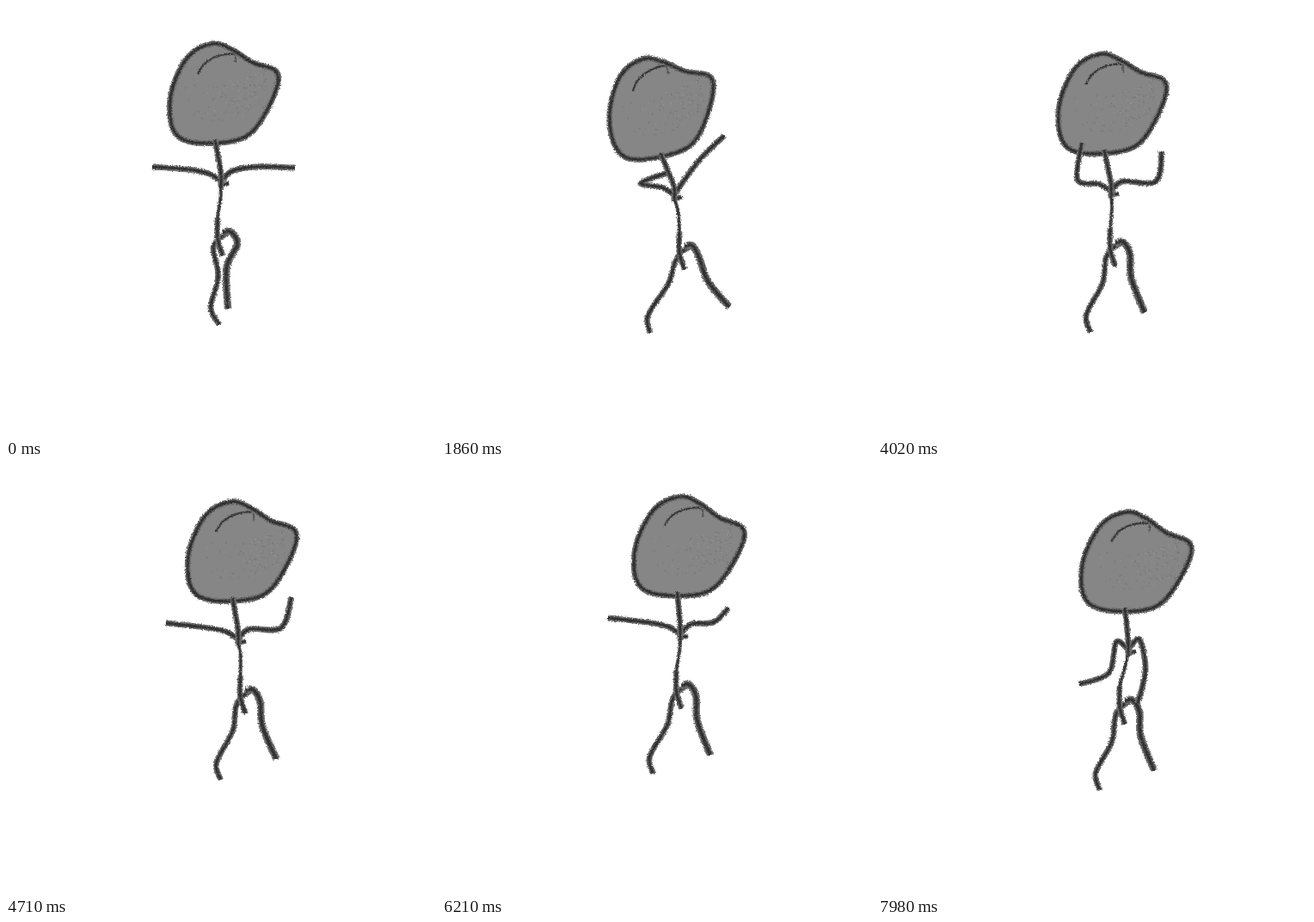
Write an HTML page that moves like this. It is 500 by 500 pixels and loops after 8000 ms.

```html
<!DOCTYPE html>
<html lang="en">
<head>
<meta charset="utf-8">
<title>Dancing stick figure</title>
<style>
  html, body { margin: 0; width: 100%; height: 100%; overflow: hidden; background: #fff; }
  svg { display: block; width: 100vw; height: 100vh; }
  path { fill: none; stroke-linejoin: round; }
</style>
</head>
<body>
<svg viewBox="0 0 500 500">
  <defs>
    <filter id="rough" filterUnits="userSpaceOnUse" x="0" y="0" width="500" height="500" color-interpolation-filters="sRGB">
      <feTurbulence type="fractalNoise" baseFrequency="0.6" numOctaves="2" seed="4"/>
      <feColorMatrix values="1 0 0 0 0  0 1 0 0 0  0 0 1 0 0  0 0 0 0 1" result="noise"/>
      <feDisplacementMap in="SourceGraphic" in2="noise" scale="3.5" xChannelSelector="R" yChannelSelector="G"/>
    </filter>
  </defs>
  <g id="figure" filter="url(#rough)"><g id="head"></g></g>
</svg>
<script>
const LOOP = 8000, STEP = 30;
const NS = 'http://www.w3.org/2000/svg';
const figure = document.getElementById('figure');
const head = document.getElementById('head');

// Dance poses. Hands and the right elbow are measured from the chest;
// knees, foot heights and the left elbow follow from the rest.
const pose = (t, neck, lean, hip, feet, handL, elbowR, handR) =>
  ({ t, v: [...neck, lean, hip, ...feet, ...handL, ...elbowR, ...handR] });
const POSES = [
  pose(0,    [243, 158], 7,  251, [248, 258], [-80, -16], [40, -16], [86, -15]),
  pose(1860, [254, 174], 16, 281, [242, 334], [-8, -25],  [32, -43], [58, -68]),
  pose(2670, [290, 171], 9,  293, [243, 338], [-3, -31],  [37, -32], [75, -48]),
  pose(4020, [263, 170], 8,  275, [247, 310], [-34, -56], [52, -11], [59, -46]),
  pose(5400, [278, 158], 5,  280, [252, 319], [-10, -45], [48, -14], [65, -50]),
  pose(7020, [283, 158], 2,  275, [239, 305], [-37, -56], [30, -12], [47, -9]),
  pose(7980, [287, 170], 4,  286, [258, 321], [-57, 41],  [20, 25],  [11, 63])
];
const ARM_OUT = [-84, -18];

const mix = (a, b, k) => a + (b - a) * k;

// Eased pose values, and a swing that peaks halfway between two poses
function sample(t) {
  let i = 0;
  while (i < POSES.length - 2 && t >= POSES[i + 1].t) i++;
  const a = POSES[i], b = POSES[i + 1];
  const u = Math.min(1, (t - a.t) / (b.t - a.t));
  const e = u * u * (3 - 2 * u);
  return { v: a.v.map((x, k) => mix(x, b.v[k], e)), swing: Math.sin(Math.PI * u) ** 2 };
}

// Smooth curve through all points
function curve(pts, closed) {
  const n = pts.length;
  const at = i => closed ? pts[(i + n) % n] : pts[Math.max(0, Math.min(n - 1, i))];
  let d = 'M' + pts[0];
  for (let i = 0; i < (closed ? n : n - 1); i++) {
    const [p, a, b, q] = [at(i - 1), at(i), at(i + 1), at(i + 2)];
    const c1 = a.map((x, k) => x + (b[k] - p[k]) / 6);
    const c2 = b.map((x, k) => x - (q[k] - a[k]) / 6);
    d += `C${c1} ${c2} ${b}`;
  }
  return d + (closed ? 'Z' : '');
}

function add(parent, tag, attrs) {
  const el = document.createElementNS(NS, tag);
  for (const k in attrs) el.setAttribute(k, attrs[k]);
  return parent.appendChild(el);
}

// A charcoal line: soft grey edge with a dark core
function line(parent, width) {
  const layers = [['#777', 1], ['#555', 0.68], ['#303030', 0.36]]
    .map(([stroke, k]) => add(parent, 'path', { stroke, 'stroke-width': width * k }));
  return pts => layers.forEach(p => p.setAttribute('d', curve(pts, pts.closed)));
}

// Head, with its origin at the neck
const outline = [[-3, -114], [20, -107], [44, -92], [71, -82], [70, -58], [47, -16],
  [20, -1], [-28, 0], [-49, -16], [-51, -56], [-32, -98]];
outline.closed = true;
add(head, 'path', { d: curve(outline, true), style: 'fill:#868686' });
let seed = 7;
const rand = () => (seed = seed * 16807 % 2147483647) / 2147483647;
for (let i = 0; i < 150; i++) {
  const x = -35 + 95 * Math.sqrt(rand());
  add(head, 'rect', {
    x, y: -22 - rand() * 45 - Math.max(0, x) * 0.3, width: 1.5, height: 1.2,
    fill: rand() < 0.7 ? '#777' : '#929292'
  });
}
line(head, 3.6)([[-20, -79], [-12, -91], [4, -100], [24, -102], [48, -90]]);
add(head, 'path', { d: 'M18 -109Q25 -103 24 -92', stroke: '#555', 'stroke-width': 2 });
line(head, 7)(outline);

const legL = line(figure, 6.8), legR = line(figure, 8.6);
const armL = line(figure, 6.8), armR = line(figure, 7);
const nub = line(figure, 5.5), waist = line(figure, 4.4);
const neck = line(figure, 6.8), hips = line(figure, 6.8);
const nick = add(figure, 'path', { stroke: '#fff', 'stroke-width': 1.2 });

function draw(t) {
  const { v, swing } = sample(t);
  let [nx, ny, lean, hx, footL, footR, lx, ly, ex, ey, rx, ry] = v;
  nx -= 7 * swing;
  ny -= 6 * swing;
  const cx = nx + lean, cy = ny + 45, hy = cy + 85.5;
  const C = (x, y) => [cx + x, cy + y];
  const H = (x, y) => [hx + x, hy + y];

  head.setAttribute('transform', `translate(${nx} ${ny}) rotate(${7 - lean})`);

  neck([[nx, ny - 3], [nx + lean * 0.55, ny + 18], C(0, -8), C(0, 8)]);
  waist([C(0, 4), C((hx - cx) / 2 - 1, 20), H(-5, -42), H(-5, -32)]);
  hips([H(-5, -42), H(-5, -18), H(1, 2)]);
  nub([C(-3, 6), C(9, 3)]);
  nick.setAttribute('d', `M${H(-2, -35)}L${H(4, -27)}`);

  // The left arm stretches out between poses; a lowered hand drops the elbow
  lx = mix(lx, ARM_OUT[0], swing);
  ly = mix(ly, ARM_OUT[1], swing);
  const drop = Math.max(0, ly);
  armL([C(0, 1), C(-14, -8), C(-39 + drop * 0.4, -13 + drop), C(lx, ly)]);
  armR([C(0, 1), C(13, Math.min(-11, ey * 0.43)), C(ex, ey), C(rx, ry)]);

  // Feet rise as the legs spread
  const yL = hy + 82 - (footL - hx) ** 2 / 230;
  const yR = hy + 64 - (footR - hx) ** 2 / 150;
  const kneeL = [mix(hx, footL, 0.5) - 4, yL - 48];
  legL([H(8, -25), H(-3, -18), H(-10, -7),
    [mix(hx - 10, kneeL[0], 0.65) + 2.5, mix(hy - 7, kneeL[1], 0.65)], kneeL,
    [mix(kneeL[0], footL, 0.6) - 9, mix(kneeL[1], yL, 0.6)], [footL, yL]]);
  legR([H(1, -25), H(10, -26), H(18, -12), [mix(hx, footR, 0.5) + 2, hy + 16], [footR, yR]]);
}

const start = performance.now();
function tick(now) {
  const t = Math.max(0, now - start) % LOOP;
  draw(Math.floor(t / STEP) * STEP);
  requestAnimationFrame(tick);
}
draw(0);
requestAnimationFrame(tick);
</script>
</body>
</html>
```
